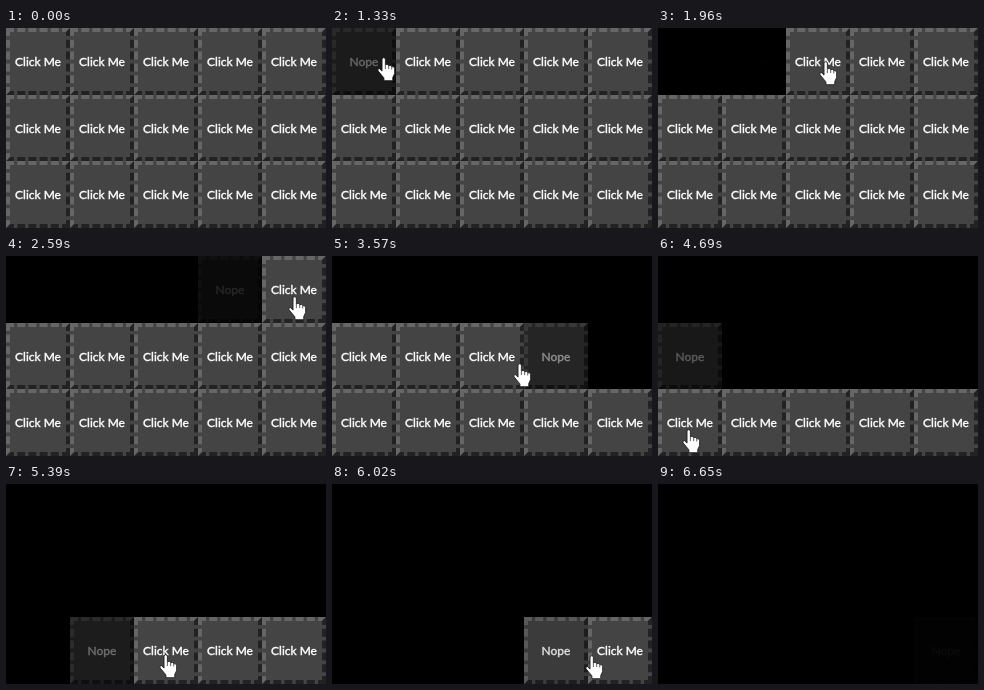
An HTML page that plays this animation: 320 by 200 pixels, repeating every 7070 ms.

```html
<!DOCTYPE html>
<html lang="en">
<head>
<meta charset="utf-8">
<title>Click Me</title>
<style>
  html, body { margin: 0; width: 100%; height: 100%; overflow: hidden; background: #000; }
  #stage { position: relative; width: 320px; height: 200px; overflow: hidden; }
  .cell {
    position: absolute; box-sizing: border-box; padding-top: 2px;
    width: 20%; height: calc(100% / 3);
    display: flex; align-items: center; justify-content: center;
    background: #444; color: #fff;
    border: 4px dashed; border-color: #666 #222 #222 #666;
    font: 400 12px/1.2 Lato, sans-serif; white-space: nowrap;
    -webkit-text-stroke: .4px currentColor;
  }
  #hand { position: absolute; left: 0; top: 0; overflow: visible; }
</style>
</head>
<body>
<div id="stage">
  <svg id="hand" width="18" height="24">
    <g transform="scale(1.1)">
      <path fill="#fff" stroke="#111" stroke-width=".7" stroke-linejoin="round"
        d="M4.6 1.5Q6.1-.2 7.6 1.5V7Q9.8 6.2 10.6 7.9Q12.7 7.2 13.4 8.8Q15.9 8.3 16 10.5V15L14.3 18.7V21.5H6.3V19L1 12.6Q.1 10.4 2.2 10.6L4.6 12.8Z"/>
      <path fill="none" stroke="#333" stroke-width=".7" d="M7.6 7v4M10.6 8v3M13.4 9v2.4"/>
    </g>
  </svg>
</div>
<script>
const LOOP = 7070, STEP = 70, END = 6650, FADE = 420, COLS = 5;

// first click and time between clicks in each row
const rows = [
  { start: 1185, gap: 390 },
  { start: 3100, gap: 358 },
  { start: 4890, gap: 360 }
];

// pointer path: time, x, y
const path = [
  [840, -6, 42], [1330, 51, 30], [2310, 235, 38], [2590, 288, 41],
  [3080, 290, 109], [3570, 187, 108], [4470, 30, 106],
  [4690, 30, 174], [5390, 159, 171], [6580, 345, 174]
];

const stage = document.getElementById('stage');
const hand = document.getElementById('hand');
const cells = [];

rows.forEach(({ start, gap }, row) => {
  for (let i = 0; i < COLS; i++) {
    const col = row % 2 ? COLS - 1 - i : i;
    const el = document.createElement('div');
    el.className = 'cell';
    el.style.left = col * 100 / COLS + '%';
    el.style.top = row * 100 / rows.length + '%';
    stage.insertBefore(el, hand);
    cells.push({ el, click: start + i * gap });
  }
});

// cubic-bezier(.25, .1, .25, 1)
function ease(p) {
  if (p <= 0) return 0;
  if (p >= 1) return 1;
  const curve = (a, b, u) => 3 * a * u * (1 - u) ** 2 + 3 * b * u * u * (1 - u) + u ** 3;
  let lo = 0, hi = 1;
  for (let i = 0; i < 20; i++) {
    const mid = (lo + hi) / 2;
    if (curve(.25, .25, mid) < p) lo = mid; else hi = mid;
  }
  return curve(.1, 1, lo);
}

function slope(i, k) {
  const a = path[Math.max(i - 1, 0)], b = path[Math.min(i + 1, path.length - 1)];
  return (b[k] - a[k]) / (b[0] - a[0]);
}

// smooth curve through the path points
function pointer(t) {
  let i = 0;
  while (i < path.length - 2 && path[i + 1][0] <= t) i++;
  const a = path[i], b = path[i + 1], d = b[0] - a[0], u = (t - a[0]) / d;
  return [1, 2].map(k => Math.round(
    (1 + 2 * u) * (1 - u) ** 2 * a[k] + u * u * (3 - 2 * u) * b[k] +
    u * (1 - u) ** 2 * d * slope(i, k) + u * u * (u - 1) * d * slope(i + 1, k)));
}

function draw(ms) {
  const t = Math.min(Math.floor(ms % LOOP / STEP) * STEP, END);
  for (const { el, click } of cells) {
    const label = t < click ? 'Click Me' : 'Nope';
    if (el.textContent !== label) el.textContent = label;
    el.style.opacity = 1 - ease((t - click) / FADE);
  }
  const shown = t >= path[0][0] && t <= path[path.length - 1][0];
  hand.style.display = shown ? '' : 'none';
  if (shown) {
    const [x, y] = pointer(t);
    hand.style.transform = `translate(${x - 6}px, ${y - 1}px)`;
  }
}

const start = performance.now();
function tick() {
  draw(performance.now() - start);
  requestAnimationFrame(tick);
}
tick();
</script>
</body>
</html>
```
